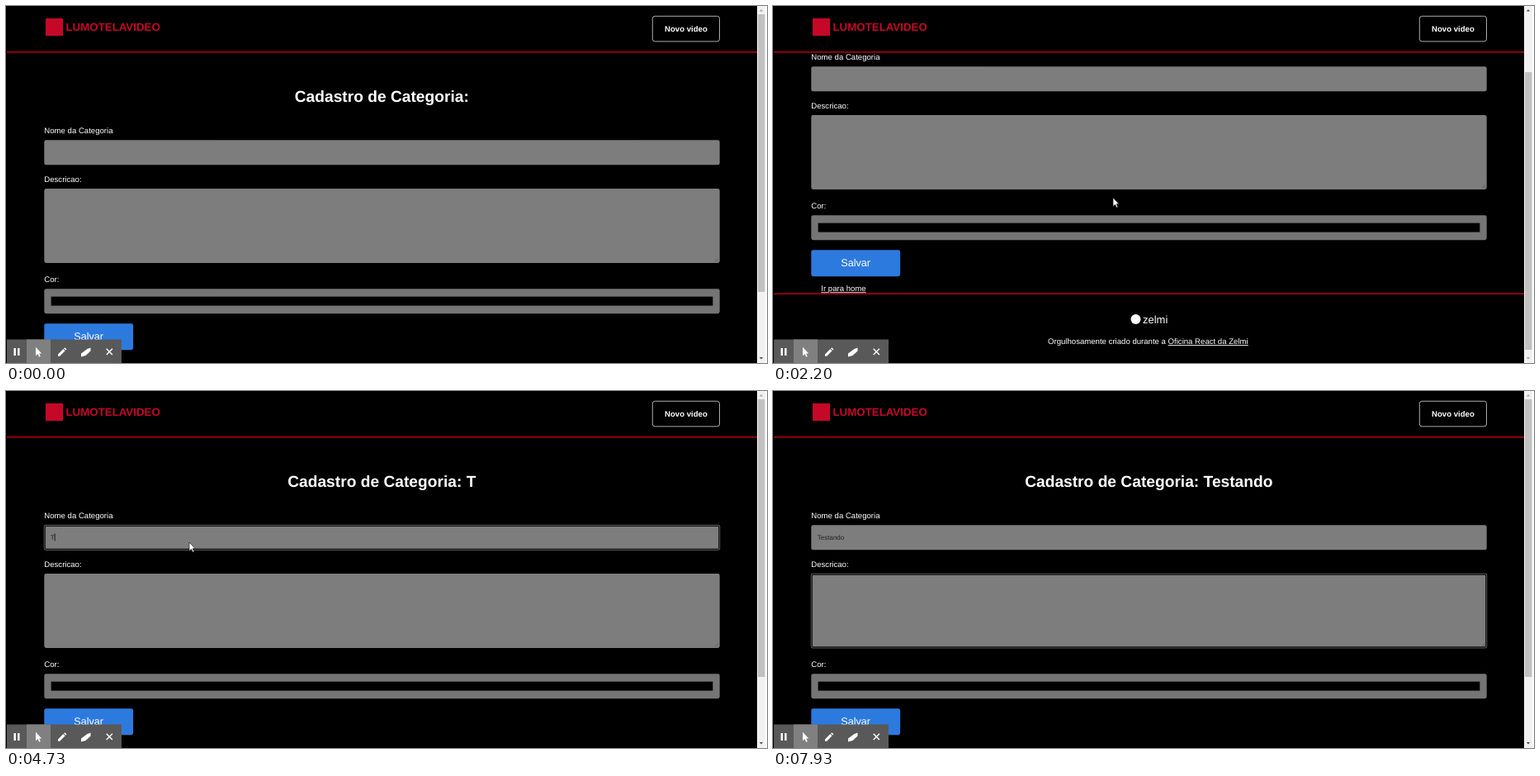
An HTML page that plays this animation: 922x432 px, repeating every 8 s.

```html
<!DOCTYPE html>
<html lang="pt">
<head>
<meta charset="utf-8">
<title>Cadastro de Categoria</title>
<style>
  html, body { margin: 0; width: 100%; height: 100%; overflow: hidden; background: #000; }
  svg { display: block; width: 922px; height: 432px; }
  text { font: 9.6px "Liberation Sans", Arial, sans-serif; fill: #fff; text-rendering: geometricPrecision; white-space: pre; }
  .bold { font-weight: bold; }
  .link { text-decoration: underline; }
  .field { fill: #7d7d7d; }
  .line { fill: #b8000f; }
  #title { font-size: 19.2px; }
  #typed { font-size: 8px; fill: #222; }
</style>
</head>
<body>
<svg viewBox="0 0 922 432">
  <defs>
    <path id="arrow" d="M0 0V10.5L2.5 8.3L4.2 12L5.8 11.3L4.2 7.7H7.2Z"/>
  </defs>
  <rect width="922" height="432"/>

  <g id="page">
    <text id="title" class="bold" x="455.3" y="116.3" text-anchor="middle"></text>
    <text x="46.3" y="154">Nome da Categoria</text>
    <rect class="field" x="46.3" y="162.3" width="818.4" height="30" rx="2.4"/>
    <text id="typed" x="53.8" y="179.6"></text>
    <text x="46.3" y="213">Descricao:</text>
    <rect class="field" x="46.3" y="221" width="818.4" height="90" rx="2.4"/>
    <path d="M858.5 309.5l4.5-4.5M861 309.5l2-2" stroke="#555" stroke-width=".6"/>
    <g id="ring" fill="none">
      <rect x="46.2" width="818.6" rx="2" stroke="#777" stroke-width=".7"/>
      <rect x="47.2" width="816.6" rx="1.5" stroke="#111" stroke-width="1.3"/>
    </g>
    <rect id="caret" width=".8" height="9" fill="#000"/>
    <text x="46.3" y="334">Cor:</text>
    <rect x="46.3" y="342.2" width="818.4" height="30" rx="2.4" fill="#757575"/>
    <rect x="54.3" y="351.3" width="802.4" height="11.6" stroke="#686868" stroke-width=".6"/>
    <rect x="46.3" y="384.2" width="107.8" height="32" rx="2.4" fill="#2d7ade"/>
    <text x="100.2" y="403.9" text-anchor="middle" style="font-size:12.6px">Salvar</text>
    <text class="link" x="58.3" y="434.3">Ir para home</text>
    <rect class="line" x="1" y="436.5" width="909" height="1.5"/>
    <circle cx="439.5" cy="468" r="6" fill="#fff"/>
    <text x="448" y="472.5" style="font-size:13px">zelmi</text>
    <text x="333" y="498.2">Orgulhosamente criado durante a <tspan class="link">Oficina React da Zelmi</tspan></text>
  </g>

  <rect width="910" height="55"/>
  <rect class="line" x="1" y="55" width="909" height="1.5"/>
  <rect x="48" y="15" width="21" height="21" fill="#c60828"/>
  <text class="bold" x="72.5" y="30.4" style="font-size:13.3px;fill:#c60828">LUMOTELAVIDEO</text>
  <rect x="783.3" y="12.3" width="81.2" height="30.6" rx="3" fill="none" stroke="#d8d8d8" stroke-width=".8"/>
  <text class="bold" x="823.9" y="30.8" text-anchor="middle">Novo video</text>

  <rect x="910" width="10" height="432" fill="#f1f1f1"/>
  <rect x="920" width="2" height="432" fill="#fff"/>
  <rect id="thumb" x="911" width="8.4" height="336" fill="#c1c1c1"/>
  <path id="up" d="M912.8 6.6h4.4l-2.2-2.5z"/>
  <path id="down" d="M912.8 425h4.4l-2.2 2.5z"/>

  <rect x="1" y="403.5" width="139" height="28.5" fill="#595959"/>
  <rect x="25" y="403.5" width="29" height="28.5" fill="#808080"/>
  <g fill="#fff">
    <path d="M9.5 414h2.4v9h-2.4zM14.1 414h2.4v9h-2.4z"/>
    <use href="#arrow" transform="translate(36 412.7)"/>
    <path d="M63 421.5l6.4-6.4 2.2 2.2-6.4 6.4H63zM70.1 414.4l1.2-1.2 2.2 2.2-1.2 1.2z"/>
    <path d="M91 420.5l7.5-5.5 4-1.5v4l-6 5.5-5.5 1.5z"/>
  </g>
  <path d="M121.7 414.7l7.2 7.2m0-7.2l-7.2 7.2" stroke="#fff" stroke-width="1.4"/>

  <use id="pointer" href="#arrow" fill="#fff" stroke="#222" stroke-width=".7"/>
</svg>

<script>
const LOOP = 8000, MAX_SCROLL = 89, BLINK = 530;
const FOCUS_NAME = 3600, FOCUS_DESCRIPTION = 7260;
const WORD = "Testando";
const keyTimes = [4660, 4870, 5080, 5290, 5460, 5660, 5870, 6070];

// Rows are [time, value, ...].
const scrollPath = [[0, 0], [600, 0], [1000, 71], [1150, 89], [2300, 89], [2460, 33], [2660, 4], [2730, 0]];
const pointerPath = [[0, 440, 270], [500, 440, 270], [900, 425, 85], [1300, 425, 85], [2100, 412, 232],
  [2750, 412, 232], [3350, 222, 183], [6850, 222, 183], [7200, 222, 260]];
const grayRows = [[162, 192], [221, 311], [342, 372]];

const el = id => document.getElementById(id);
const [page, title, typed, ring, caret, thumb, up, down, pointer] =
  ["page", "title", "typed", "ring", "caret", "thumb", "up", "down", "pointer"].map(el);

function along(path, t) {
  const next = path.findIndex(p => p[0] > t);
  if (next < 0) return path.at(-1).slice(1);
  const a = path[next - 1], b = path[next];
  const k = (t - a[0]) / (b[0] - a[0]);
  return a.slice(1).map((v, i) => v + (b[i + 1] - v) * k);
}

function show(node, visible) {
  node.setAttribute("visibility", visible ? "visible" : "hidden");
}

function place(node, x, y) {
  node.setAttribute("transform", `translate(${x} ${y})`);
}

function drawFocus(t) {
  const inDescription = t >= FOCUS_DESCRIPTION;
  const focused = t >= FOCUS_NAME;
  show(ring, focused);
  const top = inDescription ? 221 : 162.3;
  const height = inDescription ? 90 : 30;
  [...ring.children].forEach((rect, inset) => {
    rect.setAttribute("y", top + inset);
    rect.setAttribute("height", height - 2 * inset);
  });
  const lastEvent = [FOCUS_NAME, ...keyTimes, FOCUS_DESCRIPTION].filter(e => e <= t).at(-1);
  show(caret, focused && (t - lastEvent) % (2 * BLINK) < BLINK);
  caret.setAttribute("x", 53.8 + (inDescription || !typed.textContent ? 0 : typed.getComputedTextLength()));
  caret.setAttribute("y", inDescription ? 230 : 172.5);
}

function draw(t) {
  const [scroll] = along(scrollPath, t);
  place(page, 0, -scroll);
  thumb.setAttribute("y", 10 + scroll * 0.787);
  up.setAttribute("fill", scroll > 0 ? "#505050" : "#a3a3a3");
  down.setAttribute("fill", scroll < MAX_SCROLL ? "#505050" : "#a3a3a3");

  const text = WORD.slice(0, keyTimes.filter(k => k <= t).length);
  typed.textContent = text;
  title.textContent = ("Cadastro de Categoria: " + text).trim();
  drawFocus(t);

  // Over a field the arrow becomes a text beam that is lost on the gray.
  const [x, y] = along(pointerPath, t);
  const overField = grayRows.some(([top, bottom]) => y + scroll >= top && y + scroll <= bottom);
  const typing = t >= keyTimes[0] && t < 6850;
  place(pointer, x, y);
  show(pointer, typing || !overField);
}

function frame() {
  draw(performance.now() % LOOP);
  requestAnimationFrame(frame);
}
frame();
</script>
</body>
</html>
```
